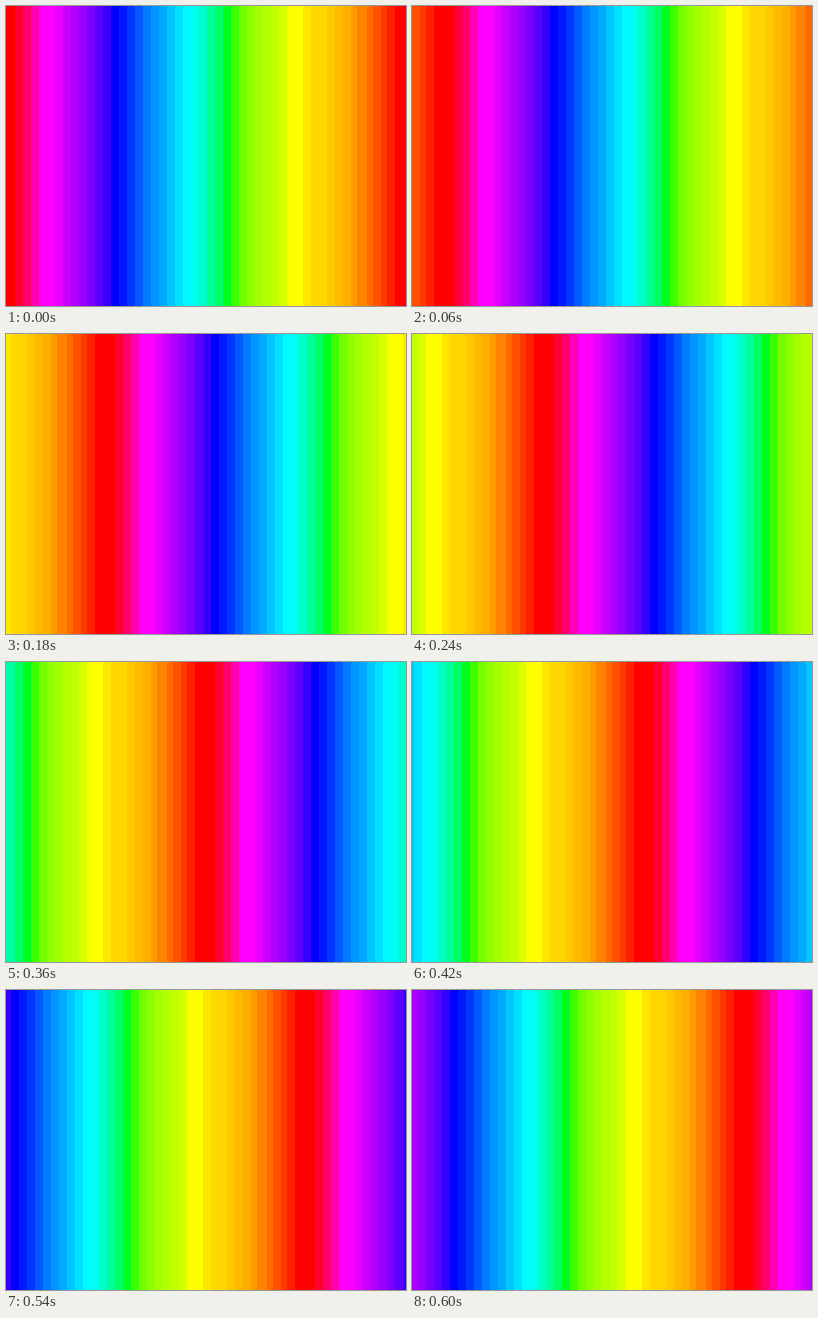
Animation of 400 by 300 pixels, one loop 0.66 s. Source, as an HTML page without scripts:

```html
<!DOCTYPE html>
<html lang="en">
<head>
<meta charset="utf-8">
<title>Rolling spectrum</title>
<style>
html, body {
  margin: 0;
  width: 100%;
  height: 100%;
  overflow: hidden;
}

/* Hard-edged bands, each ending at the given position */
.spectrum {
  width: 400px;
  height: 300px;
  background: 0 0 / 400px 300px repeat-x linear-gradient(90deg,
    #ff0000 9px,
    #ff0032 0 17px, #ff006e 0 25px, #ff00b4 0 33px, #ff00ff 0 49px,
    #e600ff 0 57px, #c800ff 0 65px, #af00ff 0 73px, #9600ff 0 81px,
    #7800ff 0 89px, #5a00ff 0 97px, #3200ff 0 105px,
    #0000ff 0 113px,
    #0019ff 0 121px, #0037ff 0 129px, #005aff 0 137px, #007dff 0 145px,
    #0096ff 0 153px, #00aaff 0 161px, #00c8ff 0 169px, #00e1ff 0 177px,
    #00faff 0 185px,
    #00fff0 0 193px, #00ffc8 0 201px, #00ff96 0 209px, #00ff64 0 217px,
    #00ff1e 0 225px,
    #3cff00 0 233px, #73ff00 0 241px, #91ff00 0 249px, #a5ff00 0 257px,
    #b4ff00 0 265px, #c3ff00 0 273px, #d7ff00 0 281px,
    #ffff00 0 297px,
    #ffe600 0 305px, #ffd700 0 321px, #ffc800 0 329px, #ffb900 0 337px,
    #ffaf00 0 345px, #ff9b00 0 351px, #ff8200 0 361px, #ff6900 0 367px,
    #ff5000 0 375px, #ff3700 0 381px, #ff1e00 0 389px,
    #ff0000 0);
  animation: roll 660ms step-end infinite;
}

/* A twelfth of the width per step, on whole pixels */
@keyframes roll {
  0% { background-position-x: 0; }
  9.09% { background-position-x: 33px; }
  18.18% { background-position-x: 67px; }
  27.27% { background-position-x: 100px; }
  36.36% { background-position-x: 133px; }
  45.45% { background-position-x: 167px; }
  54.54% { background-position-x: 200px; }
  63.63% { background-position-x: 233px; }
  72.72% { background-position-x: 267px; }
  81.81% { background-position-x: 300px; }
  90.9%, 100% { background-position-x: 333px; }
}
</style>
</head>
<body>
<div class="spectrum"></div>
</body>
</html>
```
